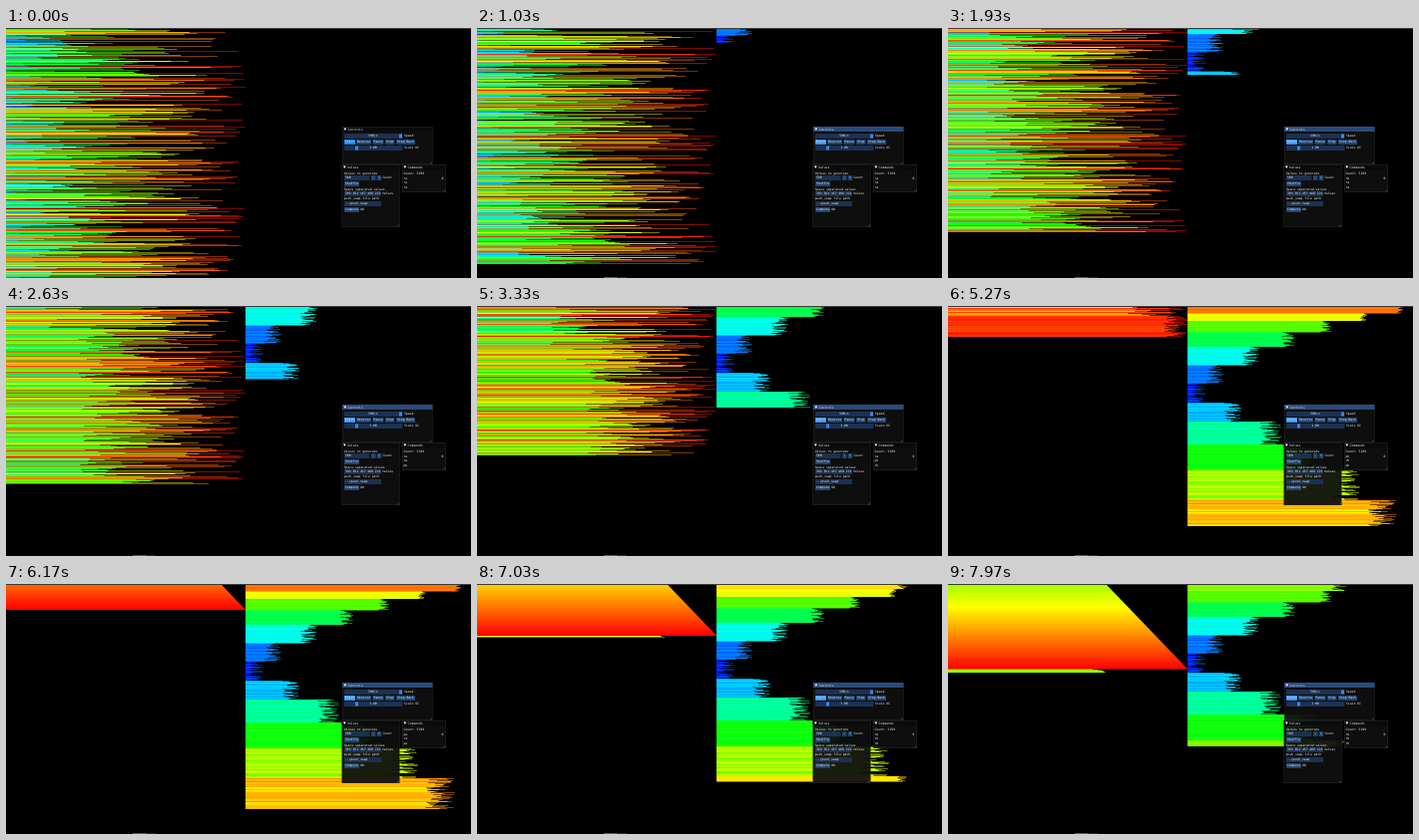
An HTML page with a canvas that plays this animation: 466x251 px, repeating every 8000 ms.

```html
<!DOCTYPE html>
<html lang="en">
<head>
<meta charset="utf-8">
<title>Stack sort</title>
<style>
html, body { margin: 0; width: 100%; height: 100%; overflow: hidden; background: #000; }
canvas { display: block; width: 466px; height: 251px; }
</style>
</head>
<body>
<canvas id="stage" width="466" height="251"></canvas>
<script>
const ctx = document.getElementById('stage').getContext('2d');
const LOOP = 8000, START = 620;
const N = 500, HALF = 240, CHUNK = 75;
// How many values of each chunk go to the bottom of the second stack.
const LOWS = [38, 38, 46, 52, 60, 62, 44];

function shuffled() {
  let seed = 20177;
  const rand = () => (seed = (seed * 1664525 + 1013904223) >>> 0) / 4294967296;
  const list = Array.from({ length: N }, (_, i) => i);
  for (let i = N - 1; i > 0; i--) {
    const j = Math.floor(rand() * (i + 1));
    [list[i], list[j]] = [list[j], list[i]];
  }
  return list;
}

const moves = {
  ra: (a, b) => a.push(a.shift()),
  rb: (a, b) => b.push(b.shift()),
  rra: (a, b) => a.unshift(a.pop()),
  rrb: (a, b) => b.unshift(b.pop()),
  pa: (a, b) => a.unshift(b.shift()),
  pb: (a, b) => b.unshift(a.shift())
};

function plan(values) {
  const a = values.slice(), b = [], ops = [], log = [];
  let done = 0, parked = 0;
  const run = op => {
    moves[op](a, b);
    ops.push(op);
    log.push({ size: b.length, done, parked });
  };

  LOWS.forEach((low, c) => {
    const start = c * CHUNK, end = Math.min(start + CHUNK, N);
    while (b.length < end) {
      const v = a[0];
      if (v >= end) { run('ra'); continue; }
      run('pb');
      if (v < start + low) run('rb');
    }
  });

  while (done < N) {
    const need = N - 1 - done, top = b[0], last = a[a.length - 1];
    if (parked && last === need) {
      done++;
      parked--;
      run('rra');
    } else if (top === need) {
      done++;
      run('pa');
    } else if (top >= need - need % CHUNK && (!parked || top > last)) {
      run('pa');
      parked++;
      run('ra');
    } else {
      run(b.indexOf(need) <= b.length / 2 ? 'rb' : 'rrb');
    }
  }
  return { ops, log };
}

const values = shuffled();
const { ops, log } = plan(values);

const when = test => log.findIndex(test) + 1;
const pushed = n => when(s => s.size >= n);
function nearest(done, parked) {
  let best = 0, bestGap = Infinity;
  log.forEach((s, i) => {
    const gap = Math.abs(s.done - done) + Math.abs(s.parked - parked);
    if (gap < bestGap) { bestGap = gap; best = i + 1; }
  });
  return best;
}
const late = nearest(166, 8);
const pace = [
  [START, 0], [1030, pushed(28)], [1930, pushed(92)], [3330, pushed(202)],
  [4370, pushed(311)], [6170, when(s => s.done >= 50)], [7970, late], [LOOP, late + 14]
];

function stepAt(t) {
  if (t <= START) return 0;
  const k = Math.max(1, pace.findIndex(p => t <= p[0]));
  const [t0, n0] = pace[k - 1], [t1, n1] = pace[k];
  return Math.floor(n0 + (n1 - n0) * (t - t0) / (t1 - t0));
}

let a = values.slice(), b = [], step = 0;
function seek(target) {
  if (target < step) { a = values.slice(); b = []; step = 0; }
  while (step < target) moves[ops[step++]](a, b);
}

// Blue for the smallest value, red for the largest.
const tint = v => `hsl(${240 * (1 - v / (N - 1))},100%,50%)`;
const span = v => (v + 1) * HALF / N;

function rect(x, y, w, h, color) {
  ctx.fillStyle = color;
  ctx.fillRect(x, y, w, h);
}

// Two neighbouring values share one pixel row, each at half strength.
function drawStack(stack, x) {
  ctx.save();
  ctx.globalCompositeOperation = 'lighter';
  ctx.globalAlpha = 0.5;
  stack.forEach((v, i) => rect(x, 1 + (i >> 1), span(v), 1, tint(v)));
  ctx.restore();
}

const FRAME = '#1c3151', BUTTON = '#1f4470', ACCENT = '#4296fa';

function label(s, x, y, align = 'left') {
  ctx.textAlign = align;
  ctx.fillStyle = '#f2f2f2';
  ctx.fillText(s, x, y);
}

function box(s, x, y, w, color = FRAME, align = 'left') {
  rect(x, y, w, 5, color);
  ctx.save();
  ctx.beginPath();
  ctx.rect(x, y, w, 5);
  ctx.clip();
  label(s, align === 'left' ? x + 1 : x + w / 2, y + 2.6, align);
  ctx.restore();
}
const button = (s, x, y, w, color = BUTTON) => box(s, x, y, w, color, 'center');

function slider(s, y, grab, name) {
  rect(339, y, 58.5, 5, FRAME);
  rect(grab, y + 0.5, 3, 4, '#3d85e0');
  label(s, 368, y + 2.6, 'center');
  label(name, 399, y + 2.6);
}

function panel(title, x, y, w, h, active) {
  rect(x, y, w, h, 'rgba(15,15,15,0.94)');
  rect(x, y, w, 5, active ? '#294a7a' : '#0a0a0a');
  ctx.strokeStyle = 'rgba(110,110,128,0.3)';
  ctx.lineWidth = 0.5;
  ctx.strokeRect(x + 0.25, y + 0.25, w - 0.5, h - 0.5);
  ctx.fillStyle = '#fff';
  ctx.beginPath();
  ctx.moveTo(x + 1.4, y + 1.5);
  ctx.lineTo(x + 4.2, y + 1.5);
  ctx.lineTo(x + 2.8, y + 4.1);
  ctx.fill();
  label(title, x + 5.6, y + 2.8);
  ctx.fillStyle = 'rgba(66,150,250,0.25)';
  ctx.beginPath();
  ctx.moveTo(x + w - 0.5, y + h - 3.5);
  ctx.lineTo(x + w - 0.5, y + h - 0.5);
  ctx.lineTo(x + w - 3.5, y + h - 0.5);
  ctx.fill();
}

function drawPanels(running) {
  ctx.font = '3.1px "DejaVu Sans Mono", monospace';
  ctx.textBaseline = 'middle';

  panel('Controls', 337, 99, 90.5, 38, running);
  slider('500/s', 106, 394, 'Speed');
  button('Start', 339, 112, 11, running ? ACCENT : '#1f86e8');
  button('Reverse', 351, 112, 15);
  button('Pause', 367.5, 112, 11);
  button('Stop', 380, 112, 9.5);
  button('Step Back', 391, 112, 19);
  slider('1.00', 118, 350, 'Scale UI');

  panel('Values', 336.5, 137, 58, 63);
  label('Values to generate', 338.7, 146);
  box('500', 339, 148, 25.5);
  button('-', 366, 148, 4.5);
  button('+', 371.7, 148, 4.5);
  label('Count', 377.5, 150.6);
  button('Shuffle', 339, 154, 15);
  label('Space separated values', 338.7, 162);
  box('393 361 457 468 221 9', 339, 164, 37);
  label('Values', 377, 166.6);
  label('push_swap file path', 338.7, 171.6);
  box('../push_swap', 339, 174, 37);
  button('Compute', 339, 180, 15);
  label('OK', 355.3, 182.6);

  panel('Commands', 397, 137, 44, 28);
  label('Count: 5199', 398.5, 146.4);
  label('0', 436.5, 151);
  for (let i = 0; i < 3; i++) label(ops[step + i], 398.5, 151 + i * 4.6);
}

function draw(t) {
  const running = t >= START;
  seek(stepAt(t));
  rect(0, 0, 466, 251, '#000');
  drawStack(a, 0);
  drawStack(b, HALF);
  rect(0, 0, 466, 1, '#3a3a3a');
  if (running) {
    rect(127, 250, 14, 1, '#555');
    rect(142, 250, 8, 1, '#2a2a2a');
  }
  drawPanels(running);
}

const origin = performance.now();
function tick() {
  draw((performance.now() - origin) % LOOP);
  requestAnimationFrame(tick);
}
tick();
</script>
</body>
</html>
```
